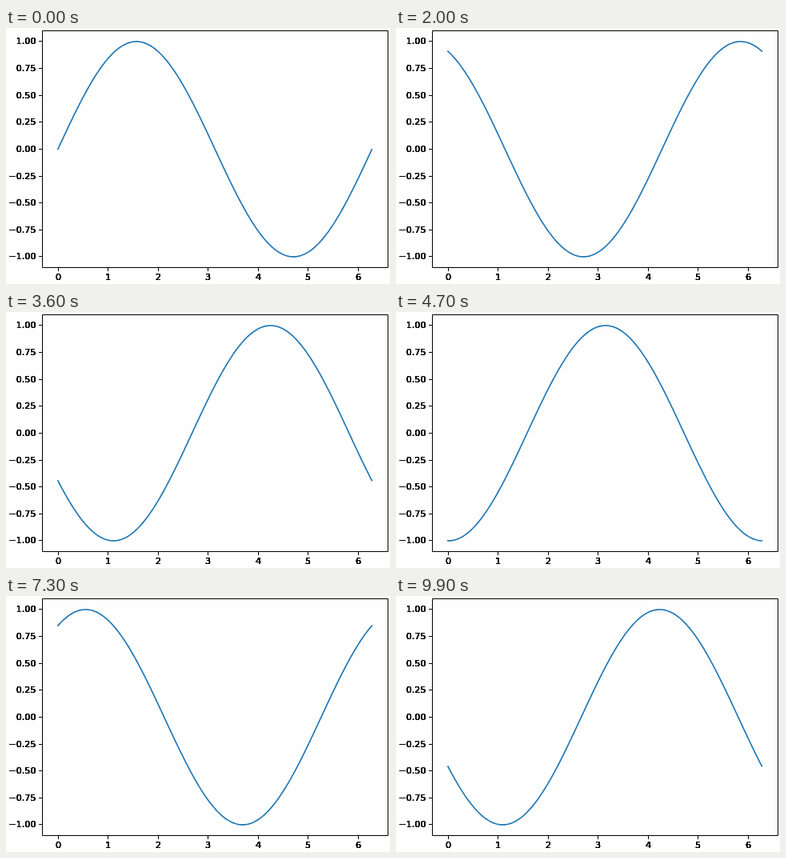
Animation, 480 px wide and 320 px high, one loop 10 s. Source, as an HTML page with a canvas:

```html
<!DOCTYPE html>
<html>
<head>
<meta charset="utf-8">
<style>
html, body { margin: 0; width: 100%; height: 100%; overflow: hidden; background: #fff; }
canvas { display: block; }
</style>
</head>
<body>
<canvas id="stage" width="480" height="320"></canvas>
<script>
const ctx = document.getElementById('stage').getContext('2d');
const snap = v => Math.floor(v) + 0.5;
const px = x => 64.9 + 62.48 * x;
const py = y => 151.45 - 134.5 * y;

function line(x1, y1, x2, y2) {
  ctx.beginPath();
  ctx.moveTo(x1, y1);
  ctx.lineTo(x2, y2);
  ctx.stroke();
}

// Repeated passes thicken the antialiased edges.
function label(text, x, y, align) {
  ctx.textAlign = align;
  for (let i = 0; i < 8; i++) ctx.fillText(text, x, y);
}

function drawAxes() {
  ctx.fillStyle = '#fff';
  ctx.fillRect(0, 0, 480, 320);
  ctx.fillStyle = '#fefefe';
  ctx.fillRect(45, 3, 432, 296);
  ctx.fillStyle = ctx.strokeStyle = '#000';
  ctx.lineWidth = 1;
  ctx.font = '11.11px "DejaVu Sans", sans-serif';
  for (let k = 0; k <= 6; k++) {
    const x = snap(65 + 62.5 * k);
    line(x, 300, x, 304);
    label(k, x, 315, 'center');
  }
  for (let k = -4; k <= 4; k++) {
    const y = snap(py(k / 4));
    line(41, y, 45, y);
    label((k / 4).toFixed(2).replace('-', '\u2212'), 37.5, y + 3.5, 'right');
  }
}

function drawCurve(phase) {
  ctx.beginPath();
  for (let x = 0; x <= 6.28; x += 0.02) ctx.lineTo(px(x), py(Math.sin(x + phase)));
  ctx.strokeStyle = '#1f77b4';
  ctx.lineWidth = 1.67;
  ctx.lineCap = 'square';
  ctx.lineJoin = 'round';
  ctx.stroke();
  ctx.lineCap = 'butt';
}

const start = performance.now();
let shown = -1;

function frame() {
  const step = Math.floor((performance.now() - start) % 10000 / 100);
  if (step !== shown) {
    shown = step;
    drawAxes();
    drawCurve(step / 10);
    ctx.strokeStyle = '#000';
    ctx.lineWidth = 1;
    ctx.strokeRect(45.5, 3.5, 432, 296);
  }
  requestAnimationFrame(frame);
}
frame();
</script>
</body>
</html>
```
